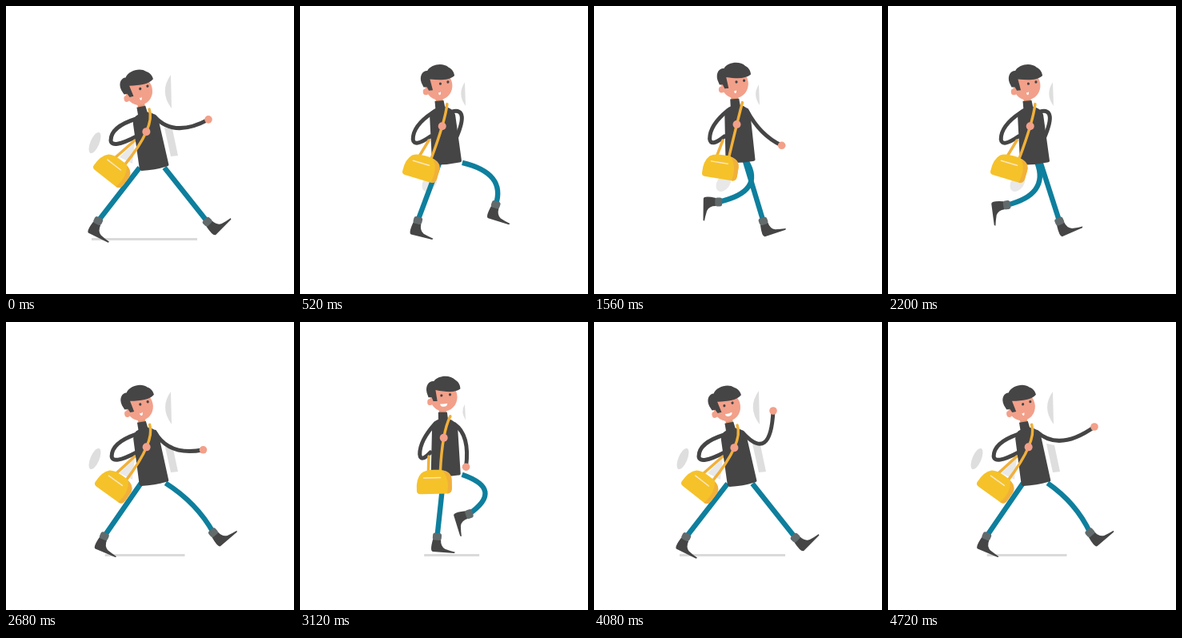
These frames come from a looping animation (360x360 px, 4760 ms). An HTML page with a canvas:

```html
<!DOCTYPE html>
<html lang="en">
<head>
<meta charset="utf-8">
<title>Walking</title>
<style>
html, body { margin: 0; width: 100%; height: 100%; overflow: hidden; background: #fff; }
canvas { display: block; width: 360px; height: 360px; }
</style>
</head>
<body>
<canvas id="stage" width="360" height="360"></canvas>
<script>
const ctx = document.getElementById('stage').getContext('2d');
const { sin, cos, PI, min, max, abs } = Math;
const LOOP = 4760, STEP = 680;
const DARK = '#454545', SKIN = '#f2a08a', BLUE = '#0e7f9d', YELLOW = '#f5c22a', ORANGE = '#f1b03a', GREY = '#dedede';

// x, y and tilt of each part at full stride and when the legs pass
const WIDE = { head: [166, 106, -14], hip: [186, 203, -10], bag: [134, 204, 38], elbow: [131, 171] };
const PASS = { head: [180.5, 93, 0], hip: [182.5, 191, 0], bag: [170, 199.5, -4], elbow: [151, 168] };

const HAIR = new Path2D('M-21-6C-23-16-17-21-12-20C-6-28 9-28 15-21C20-18 21-13 21-10C14-5 4-6-10-9L-8 5L-13 5L-15 0L-19 0Z');
const TORSO = new Path2D('M-19-2L-17-60Q-16-68-9-70L-9-79L2-79L3-71Q13-68 15-60L18-2Q18 0 15 0Q0 2-17 0Z');
const BOOT = new Path2D('M-5 3L5 3Q5 11 11 14Q18 16 24 17L23 18.5L-4 18.5Q-8 18-5 3Z');
const BAG = new Path2D('M-22 11Q-23-4-16-11Q-11-15 0-15L6-15Q22-14 22 0L22 9Q22 15 16 15L-17 15Q-22 15-22 11Z');
const BAG_SIDE = new Path2D('M11-14Q23-12 22 0L22 9Q21 15 16 15Q20-2 11-14Z');

const clamp = v => max(0, min(1, v));
const mix = (a, b, k) => a.map((v, i) => v + (b[i] - v) * k);
const add = (a, b) => [a[0] + b[0], a[1] + b[1]];

function fill(path, color) {
  ctx.fillStyle = color;
  ctx.fill(path);
}

function line(d, color, width) {
  ctx.strokeStyle = color;
  ctx.lineWidth = width;
  ctx.stroke(new Path2D(d));
}

function oval(x, y, rx, ry, color, angle = 0) {
  ctx.fillStyle = color;
  ctx.beginPath();
  ctx.ellipse(x, y, rx, ry, angle, 0, 7);
  ctx.fill();
}

function placed([x, y, degrees], paint) {
  ctx.save();
  ctx.translate(x, y);
  ctx.rotate(degrees * PI / 180);
  paint();
  ctx.restore();
}

function spot([x, y, degrees], dx, dy) {
  const a = degrees * PI / 180;
  return [x + dx * cos(a) - dy * sin(a), y + dx * sin(a) + dy * cos(a)];
}

function drawTraces(beat, k) {
  const half = 66 * beat ** 4, middle = 182 - 9 * beat;
  if (half > 1) line(`M${middle - half} 291.5H${middle + half}`, '#dadada', 3);
  const top = 86 + 18 * k, bottom = 128 - 6 * k;
  fill(new Path2D(`M206 ${top}L207 ${bottom}Q${191 + 10 * k} ${(top + bottom) / 2} 206 ${top}`), GREY);
  if (k < 0.08) {
    oval(111, 171, 5.5, 14, GREY, 0.4);
    fill(new Path2D('M198 152L208 154L215 187L206 188Z'), GREY);
    fill(new Path2D('M161 170L142 189L158 197Z'), '#e8e8e8');
  } else if (abs(beat) < 0.4) {
    oval(162, 221, 8, 12, '#e8e8e8', 0.6);
  }
}

// The foot slides back on the ground for one step, then swings forward for the next.
function drawLeg(t, reach, hipY) {
  const u = t / STEP % 2, q = u % 1, arc = sin(PI * q);
  const back = 115 - reach;
  let hip, ankle, angle, bend;
  if (u < 1) {
    hip = [198 - 31 * q, hipY];
    ankle = [reach + back * q, 270 - 2 * q];
    angle = q < 0.5 ? 90 * q - 45 : 52 * q - 26;
    bend = [0, 0];
  } else {
    hip = [167 + 31 * q + 18 * arc, hipY];
    ankle = [115 - back * q + 100 * q ** 3 * arc, 269 - 30 * arc];
    angle = 26 - 71 * q + 100 * sin(PI * min(1, q / 0.9));
    bend = [34 * arc, (25 - 50 * q) * arc];
  }
  const thigh = add(mix(hip, ankle, 1 / 3), bend), shin = add(mix(hip, ankle, 2 / 3), bend);
  line(`M${hip}C${thigh} ${shin} ${ankle}`, BLUE, 6.4);
  placed([...ankle, angle], () => {
    fill(BOOT, DARK);
    ctx.fillStyle = '#626a6b';
    ctx.beginPath();
    ctx.roundRect(-5.5, -5, 11, 9, 3);
    ctx.fill();
  });
}

// The free arm swings with the walk and blends into a wave around the loop's end.
function drawFreeArm(t, shoulder) {
  const c = cos(PI * t / STEP), w = cos(2 * PI * (t - 4080) / 427);
  const waving = max(clamp((t - 3600) / 400), 0.6 - t / 333);
  const hand = mix([216 + 31 * c, 183 - 24 * c * c], [241 - 17 * w, 121 - 10 * w], waving);
  const sag = mix([7 - 20 * c, 26 * c - 6], [4 + 12 * w, 40 + 12 * w], waving);
  line(`M${shoulder}Q${add(mix(shoulder, hand, 0.5), sag)} ${hand}`, DARK, 5);
  oval(...hand, 4.8, 4.8, SKIN);
}

function drawHead(turn) {
  oval(-17, 6, 3.5, 4, SKIN);
  oval(0, 0, 17, 18, SKIN);
  fill(HAIR, DARK);
  oval(2.3 - 5 * turn, -2, 1.6, 1.7, DARK);
  oval(12 - 4 * turn, -3, 1.6, 1.7, DARK);
  const w = 1.5 + 3 * turn;
  fill(new Path2D(`M${-w} 8.5Q0 ${10 - turn} ${w} 8Q${w} 12 0 12Q${-w} 12 ${-w} 8.5Z`), '#fff');
}

function draw(t) {
  const beat = cos(2 * PI * t / STEP), k = max(0, (1 - beat) / 2) ** 0.85;
  const [head, hip, bag, elbow] = Object.keys(WIDE).map(part => mix(WIDE[part], PASS[part], k));
  const [ex, ey] = elbow;

  ctx.fillStyle = '#fff';
  ctx.fillRect(0, 0, 360, 360);
  ctx.lineCap = 'butt';
  drawTraces(beat, k);
  drawLeg(t + STEP, 245, hip[1] - 1);
  drawLeg(t, 252, hip[1] - 1);

  ctx.lineCap = 'round';
  drawFreeArm(t, spot(hip, 11, -64));
  line(`M${spot(hip, -13, -65)}Q${ex} ${ey - 20} ${ex} ${ey - 3}Q${ex + 1} ${ey + 8} 163 163`, DARK, 5);
  line(`M161 168L${spot(bag, -7, -13)}`, ORANGE, 3.5);

  placed(head, () => {
    ctx.fillStyle = '#e69a72';
    ctx.fillRect(-6, 12, 9, 9);
  });
  placed(hip, () => fill(TORSO, DARK));
  const turn = clamp(min((t - 2640) / 240, (4600 - t) / 240));
  placed(head, () => drawHead(turn));

  // The front strap runs through the gripping hand.
  const top = spot(hip, 6, -74), end = spot(bag, 8, -13), grip = spot(hip, -2.5, -47);
  const bend = mix(mix(top, end, 0.5), grip, 2);
  line(`M${top}Q${bend} ${end}`, ORANGE, 3.5);
  oval(...grip, 5, 5, SKIN);

  placed(bag, () => {
    fill(BAG, YELLOW);
    fill(BAG_SIDE, ORANGE);
    line('M-13-5H8', '#fbe6c4', 1.5);
  });
}

function tick() {
  draw(Math.floor(performance.now() % LOOP / 40) * 40);
  requestAnimationFrame(tick);
}
tick();
</script>
</body>
</html>
```
